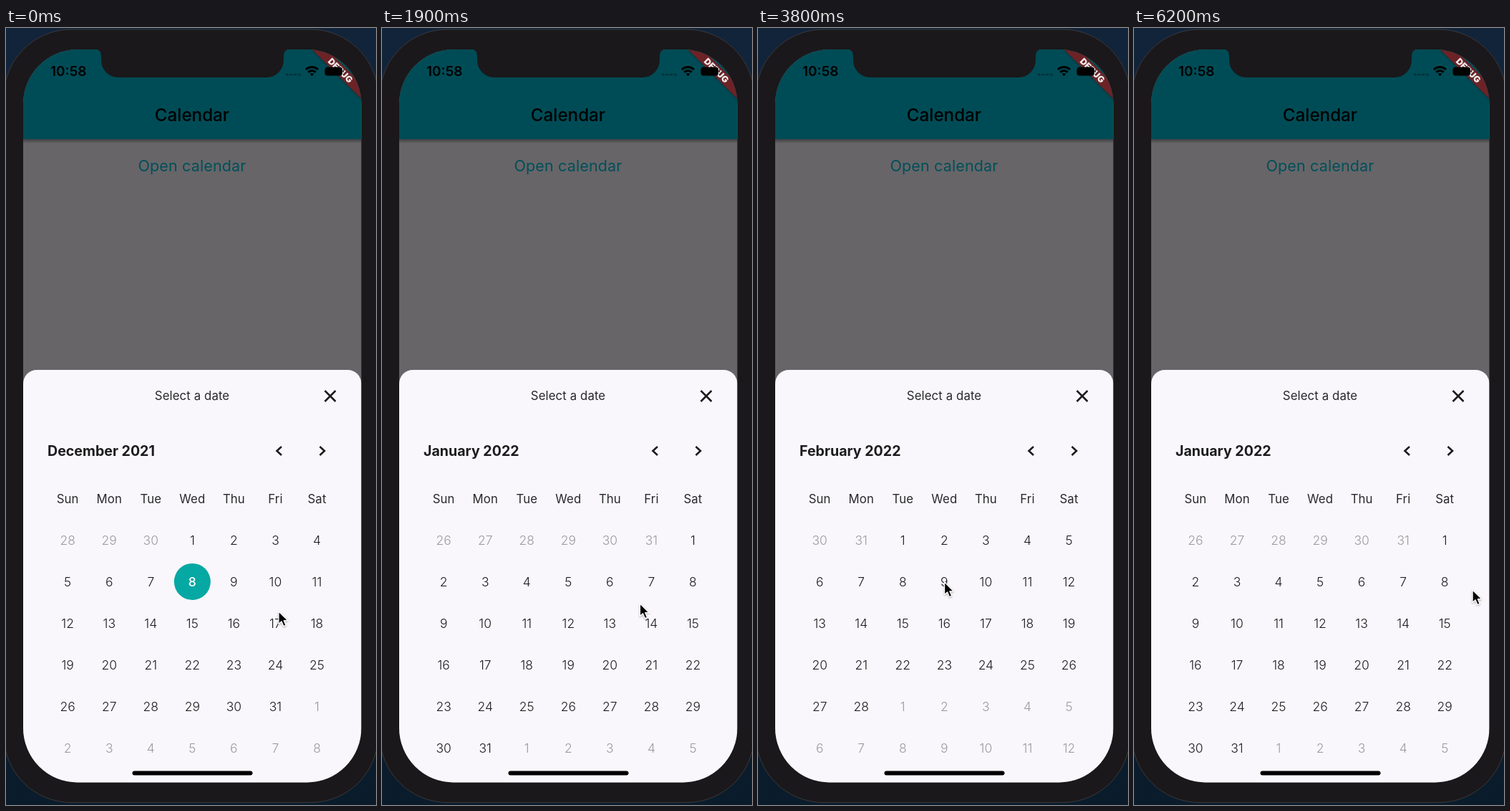
An HTML page that plays this animation: 517 by 1084 pixels, repeating every 6.3 s.

```html
<!DOCTYPE html>
<html lang="en">
<head>
<meta charset="utf-8">
<title>Calendar</title>
<style>
  html, body { margin: 0; width: 100%; height: 100%; overflow: hidden; background: #0b1a2a; }
  svg { display: block; width: 100vw; height: 100vh; font-family: Inter, Roboto, sans-serif; }
  .mid { text-anchor: middle; }
  .icon { fill: none; stroke: #1c1b1d; stroke-width: 2.6; }
  .label { font-size: 16.8px; letter-spacing: .1px; fill: #29282b; }
  .day { font-size: 17.5px; font-weight: 300; fill: #1e1d20; }
  .out { fill: #9c9b9e; }
  .picked { fill: #fff; font-weight: 500; }
</style>
</head>
<body>
<svg viewBox="0 0 517 1084">
  <defs>
    <linearGradient id="wall" x2="0" y2="1">
      <stop offset="0" stop-color="#12243a"/>
      <stop offset="1" stop-color="#0a1c2b"/>
    </linearGradient>
    <linearGradient id="shade" x2="0" y2="1">
      <stop offset="0" stop-color="#000" stop-opacity=".38"/>
      <stop offset="1" stop-color="#000" stop-opacity="0"/>
    </linearGradient>
    <clipPath id="screen"><rect x="24" y="30" width="472.5" height="1022.5" rx="76"/></clipPath>
    <filter id="soft" x="-50%" y="-50%" width="200%" height="200%">
      <feDropShadow dx="0" dy="1" stdDeviation="1.2" flood-opacity=".4"/>
    </filter>
  </defs>

  <rect width="517" height="1084" fill="url(#wall)"/>
  <rect x="-3" y="2" width="523" height="1078.5" rx="94" fill="#1a181a" stroke="#3a393d"/>

  <g clip-path="url(#screen)">
    <rect x="24" y="30" width="473" height="1023" fill="#676568"/>
    <rect x="24" y="30" width="473" height="125" fill="#004c56"/>
    <rect x="24" y="155" width="473" height="6" fill="url(#shade)"/>
    <text class="mid" x="260" y="129.5" font-size="24.2" font-weight="500">Calendar</text>
    <text class="mid" x="260" y="200" font-size="21.5" letter-spacing=".15" fill="#00505a">Open calendar</text>

    <g transform="translate(496.5 30) rotate(45)">
      <rect x="-60" y="34" width="120" height="14.5" fill="#6d2027" filter="url(#soft)"/>
      <text class="mid" y="45.7" font-size="12.3" font-weight="900" fill="#eee">DEBUG</text>
    </g>

    <path d="M24 1053V496a19 19 0 0 1 19-19H477.5a19 19 0 0 1 19 19V1053z" fill="#f9f7fb"/>
    <text class="mid label" x="260" y="519.3">Select a date</text>
    <path class="icon" d="M445.5 506l15 15m0-15l-15 15"/>
    <text id="title" x="58" y="597" font-size="19.6" font-weight="700" fill="#1c1b1d"></text>
    <path class="icon" d="M385 584l-6.5 6 6.5 6M438.5 584l6.5 6-6.5 6"/>
    <g id="months"></g>
  </g>

  <path d="M124 29q9 1 9 10v6a24 24 0 0 0 24 24H364a24 24 0 0 0 24-24v-6q0-9 9-10z" fill="#1a181a"/>
  <text x="62" y="67.3" font-size="19" font-weight="600">10:58</text>
  <path d="M391 65h21" stroke="#00333b" stroke-width="2.5" stroke-dasharray="4 1.6"/>
  <g fill="none" stroke="#000" stroke-width="3">
    <path d="M419 58a12 12 0 0 1 17 0M422.2 61.7a7.5 7.5 0 0 1 10.6 0"/>
    <path d="M424.7 64.3a4 4 0 0 1 5.6 0l-2.8 3z" fill="#000" stroke="none"/>
  </g>
  <rect x="445.5" y="54.5" width="24.5" height="12" rx="3.5"/>
  <path d="M471.3 58.3q2 2.2 0 4.4z"/>
  <rect x="176.5" y="1036.5" width="168" height="6" rx="3"/>

  <path id="cursor" filter="url(#soft)" stroke="#fff" stroke-width="1.2" stroke-linejoin="round"
    d="M0 0V17.5l4-3.7 2.9 6.8 3.2-1.4-2.9-6.5h5.5z"/>
</svg>

<script>
const LOOP = 6300, STEP = 100, PAGE = 560;
const COL = 58.05, ROW = 58.1, LEFT = 86.2, TOP = 714.3;
const PICK_TIME = 4000;
const WEEK = ["Sun", "Mon", "Tue", "Wed", "Thu", "Fri", "Sat"];
const NAMES = ["December 2021", "January 2022", "February 2022"];

// Each swipe turns pages and drags the pointer along; each move only shifts the pointer.
const HOME = { x: 381, y: 814 };
const SWIPES = [
  { mid: 987, speed: 0.0126, pages: 1 },
  { mid: 2699, speed: 0.0126, pages: 1 },
  { mid: 5400, speed: 0.0095, pages: -1 }
];
const MOVES = [
  { mid: 1620, speed: 0.025, dx: PAGE - 20, dy: -11 },
  { mid: 3450, speed: 0.02, dx: PAGE - 100, dy: -30 },
  { mid: 4500, speed: 0.02, dx: 20, dy: 4 },
  { mid: 5850, speed: 0.02, dx: 192 - PAGE, dy: 7 }
];

const $ = id => document.getElementById(id);
const sum = (list, fn) => list.reduce((total, item) => total + fn(item), 0);
const ease = ({ mid, speed }, time) => 1 / (1 + Math.exp(speed * (mid - time)));

function add(parent, tag, attrs, text = "") {
  const el = document.createElementNS("http://www.w3.org/2000/svg", tag);
  for (const key in attrs) el.setAttribute(key, attrs[key]);
  el.textContent = text;
  parent.append(el);
  return el;
}

function buildMonth(index) {
  const group = add($("months"), "g", {});
  const first = new Date(Date.UTC(2021, 11 + index, 1));
  const days = {};
  WEEK.forEach((name, c) =>
    add(group, "text", { class: "mid label", x: LEFT + COL * c, y: 662.8 }, name));
  const dot = add(group, "circle", { r: 25.5, fill: "#06a8a3" });
  for (let i = 0; i < 42; i++) {
    const date = new Date(Date.UTC(2021, 11 + index, 1 + i - first.getUTCDay()));
    const inside = date.getUTCMonth() === first.getUTCMonth();
    const x = LEFT + COL * (i % 7), y = TOP + ROW * Math.floor(i / 7);
    const label = add(group, "text", { class: "mid day" + (inside ? "" : " out"), x, y: y + 6.3 }, date.getUTCDate());
    if (inside) days[date.getUTCDate()] = { label, x, y };
  }
  function pick(day, on) {
    const { label, x, y } = days[day];
    label.classList.toggle("picked", on);
    dot.setAttribute("cx", x);
    dot.setAttribute("cy", y);
    dot.setAttribute("visibility", on ? "visible" : "hidden");
  }
  dot.setAttribute("visibility", "hidden");
  return { group, pick };
}

const months = NAMES.map((_, i) => buildMonth(i));

function draw(now) {
  const time = Math.floor((now % LOOP) / STEP) * STEP;
  const page = sum(SWIPES, s => s.pages * ease(s, time));
  const x = HOME.x - page * PAGE + sum(MOVES, m => m.dx * ease(m, time));
  const y = HOME.y + sum(MOVES, m => m.dy * ease(m, time));
  months.forEach((m, i) => m.group.setAttribute("transform", `translate(${(i - page) * PAGE} 0)`));
  months[0].pick(8, time < PICK_TIME);
  months[2].pick(9, time >= PICK_TIME);
  $("title").textContent = NAMES[Math.round(page)];
  $("cursor").setAttribute("transform", `translate(${x} ${y})`);
}

let start;
function tick(now) {
  start ??= now;
  draw(now - start);
  requestAnimationFrame(tick);
}
draw(0);
requestAnimationFrame(tick);
</script>
</body>
</html>
```
